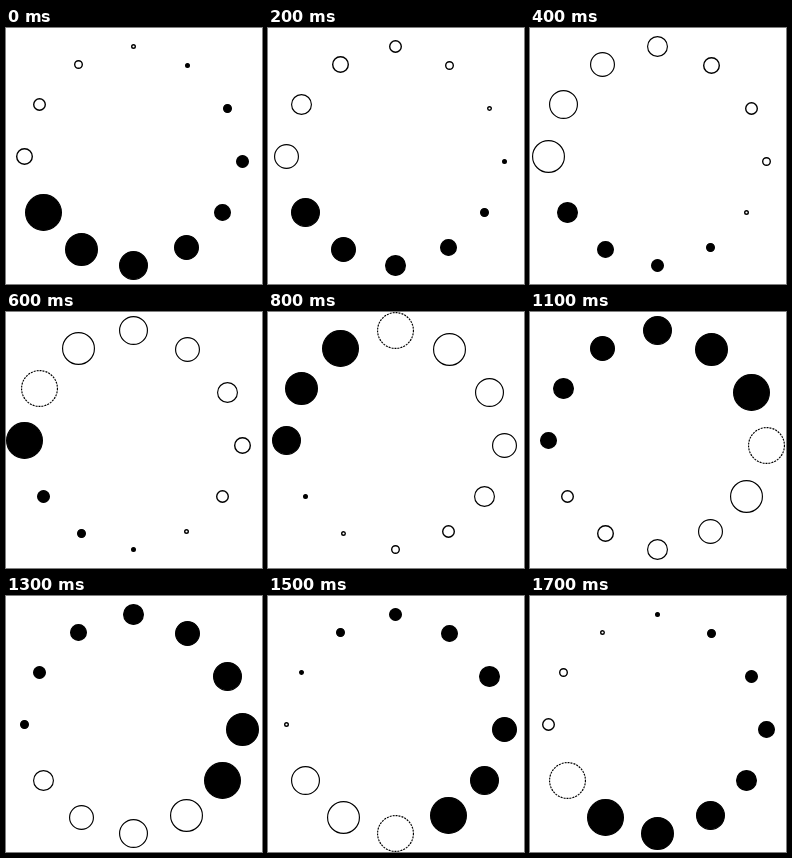
An HTML page for the animation above (1.8 s loop, 256 by 256 pixels).

```html
<!DOCTYPE html>
<html lang="en">
<head>
<meta charset="utf-8">
<title>Ring of pulsing dots</title>
<style>
  html, body { margin: 0; width: 100%; height: 100%; overflow: hidden; background: #fff; }
  svg { display: block; width: 100%; height: 100%; }
  circle { stroke: #000; }
</style>
</head>
<body>
<svg id="stage" viewBox="0 0 256 256"></svg>
<script>
const STEP = 100;
const SIZES = 9;
const STATES = SIZES * 2;

// x, y, and the state each dot starts in
const DOTS = [
  [127, 18, 0], [181, 37, 17], [221, 80, 16], [236, 133, 15],
  [216, 184, 14], [180, 219, 12], [127, 237, 11], [75, 221, 10],
  [37, 184, 9], [18, 128, 3], [33, 76, 2], [72, 36, 1]
];

// Rings grow through the first half, discs shrink through the second.
function look(state) {
  const hollow = state < SIZES;
  const size = hollow ? state + 1 : STATES - state;
  const line = hollow && size < 5 ? 1.4 : 1.15;
  return {
    r: `${size * 2 + 0.5 - line / 2}px`,
    fill: hollow ? '#fff' : '#000',
    strokeWidth: `${line}px`,
    strokeDasharray: hollow && size === SIZES ? '2px 1px' : 'none'
  };
}

const frames = Array.from({ length: STATES + 1 }, (_, i) => ({
  ...look(i % STATES),
  offset: i / STATES,
  easing: 'step-end'
}));

const stage = document.getElementById('stage');
for (const [x, y, start] of DOTS) {
  const dot = document.createElementNS('http://www.w3.org/2000/svg', 'circle');
  dot.setAttribute('cx', x + 0.5);
  dot.setAttribute('cy', y + 0.5);
  stage.append(dot);
  dot.animate(frames, {
    duration: STATES * STEP,
    delay: -start * STEP,
    iterations: Infinity
  });
}
</script>
</body>
</html>
```
